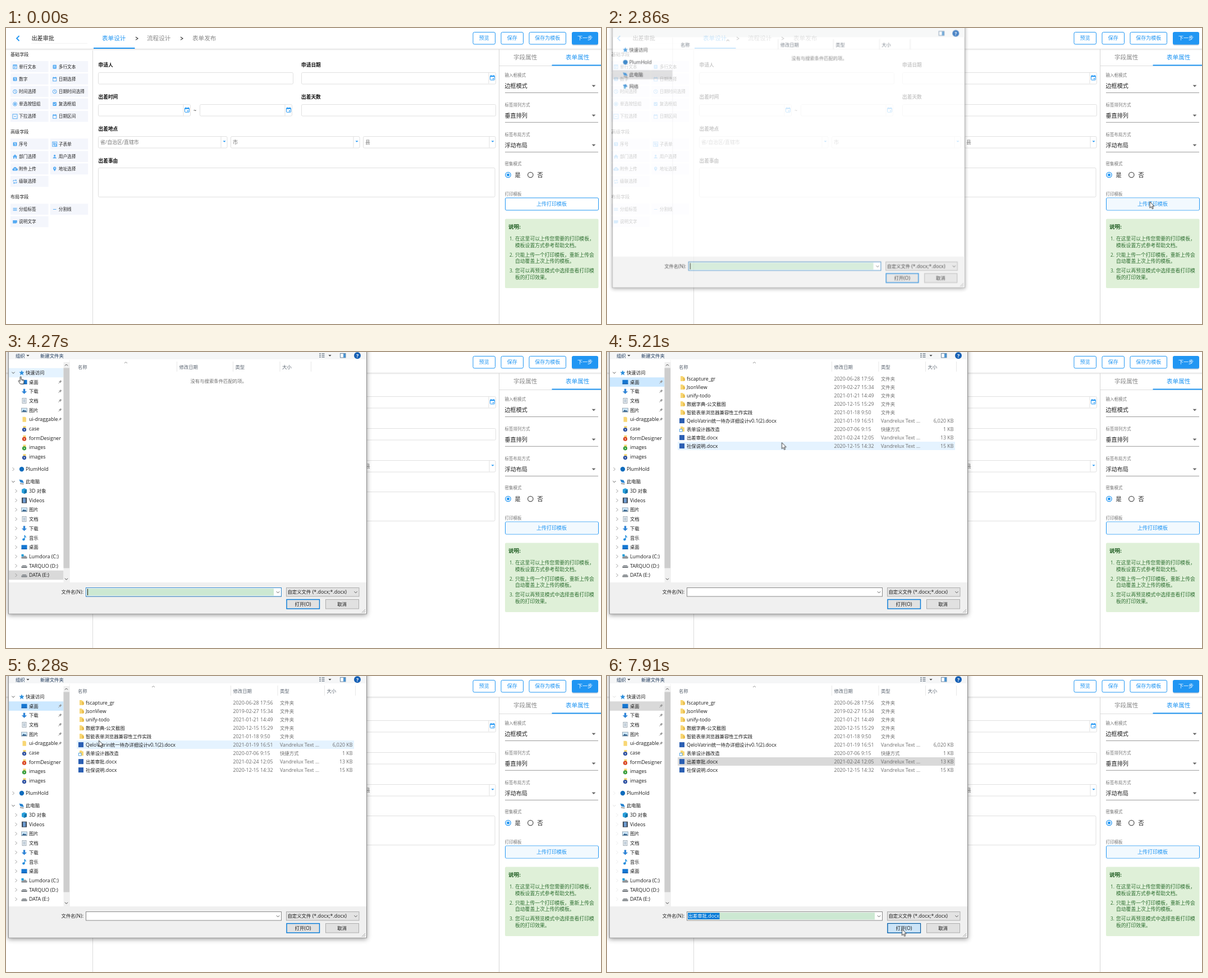
An HTML page that plays this animation: 1060x528 px, repeating every 8 s.

```html
<!DOCTYPE html>
<html lang="zh-CN">
<head>
<meta charset="utf-8">
<title>表单设计</title>
<style>
html, body { margin: 0; width: 100%; height: 100%; overflow: hidden; background: #fff; }
svg { display: block; width: 1060px; height: 528px; font-family: "Open Sans", "Noto Sans CJK SC", "Noto Sans CJK", sans-serif; }
text { white-space: pre; }
#dialog text { font-size: 8.85px; }
#dialog tspan { font-size: 8.4px; }
#dialog { transform-origin: 323px 212px; }
.frame { filter: drop-shadow(0 2px 4px rgba(0, 0, 0, .4)); }
.spin { animation: spin 1s linear infinite; }
@keyframes spin { to { transform: rotate(360deg); } }
</style>
</head>
<body>
<svg id="stage" viewBox="0 0 1060 528"></svg>
<script>
const BLUE = '#2196f3', LINE = '#e0e0e0';
let css = '';

// Timelines: each step is [milliseconds, declarations] within the 8 s loop.
const track = (cls, steps, ease = 'step-end') => {
  const frames = [...steps, [8000, steps[steps.length - 1][1]]];
  css += `@keyframes ${cls}{${frames.map(([ms, v]) => `${ms / 80}%{${v}}`).join('')}}` +
    `.${cls}{animation:${cls} 8s ${ease} infinite}`;
};
const during = (cls, from, to = 8000) => track(cls,
  [[0, 'visibility:hidden'], [from, 'visibility:visible'], [to, 'visibility:hidden']]);

// Drawing helpers; text is placed by its vertical centre.
const text = (x, y, s, size = 8.8, fill = '#333', more = '') =>
  `<text x="${x}" y="${y + size * .37}" font-size="${size}" fill="${fill}" ${more}>${s}</text>`;
const box = (x, y, w, h, fill = 'none', stroke = 'none', r = 0, more = '') =>
  `<rect x="${x}" y="${y}" width="${w}" height="${h}" rx="${r}" fill="${fill}" stroke="${stroke}" ${more}/>`;
const path = (d, stroke = 'none', width = 1, fill = 'none') =>
  `<path d="${d}" stroke="${stroke}" stroke-width="${width}" fill="${fill}"/>`;
const disc = (x, y, r, fill, stroke = 'none', width = 1) =>
  `<circle cx="${x}" cy="${y}" r="${r}" fill="${fill}" stroke="${stroke}" stroke-width="${width}"/>`;
const group = (cls, s) => `<g class="${cls}">${s}</g>`;
const at = (x, y, s) => `<g transform="translate(${x} ${y})">${s}</g>`;
const triangle = (x, y, w, fill) => path(`M${x - w} ${y - w / 2}h${2 * w}l${-w} ${w}z`, 'none', 0, fill);

const C = '#56abf3';
const solid = (s, color = C) => path(s, 'none', 0, color);
const stroke = (s, color = C, width = 1) => path(s, color, width);
const icons = {
  note: box(-3.2, -3.2, 6.4, 6.8, 'none', C) + stroke('M-3-2.4h6', C, 1.6) + stroke('M-1.8 0h3.6M-1.8 1.8h2.4'),
  clip: box(-3.2, -3.3, 6.4, 7, C, 'none', 1) + stroke('M-1.7-1h3.4M-1.7 1h3.4', '#fff', .8),
  one: box(-3.4, -3.4, 6.8, 6.8, C, 'none', 1) + stroke('M-1-1.4L.3-2V2.2', '#fff', 1),
  cal: box(-3, -2.8, 6, 6.3, 'none', C) + stroke('M-3-2h6', C, 1.5) + stroke('M-1.8-4v1.5M1.8-4v1.5'),
  clock: disc(0, 0, 3.4, 'none', C) + stroke('M0-2V.2L1.6 1.2'),
  radio: disc(0, 0, 3.4, 'none', C) + disc(0, 0, 1.9, C),
  check: box(-3.3, -3.3, 6.6, 6.6, C, 'none', 1) + stroke('M-2 0l1.5 1.5L2-1.4', '#fff'),
  drop: box(-4, -4, 8, 8, 'none', C) + triangle(0, .2, 1.8, C),
  table: box(-4, -4, 8, 8, 'none', C) + stroke('M-2.5-1.5h5M-2.5.5h2M-1.5-3v5') + box(0, 0, 3, 3, 'none', C),
  home: solid('M-4.2 0L0-3.8 4.2 0H3v3.5H1V1h-2v2.5h-2V0z'),
  user: disc(0, -1.6, 1.7, C) + solid('M-3.2 3.2c0-3.6 6.4-3.6 6.4 0z'),
  cloud: solid('M-2.5 3a2 2 0 0 1-.5-4 3.1 3.1 0 0 1 6-.3A2.1 2.1 0 0 1 3 3z') + stroke('M0 2V-.7M-1.2.4L0-.8 1.2.4', '#fff', .8),
  spot: solid('M0 4C-5-2-2-4 0-4s5 2 0 8z') + disc(0, -1.4, .9, '#fff'),
  loop: stroke('M-3 0v-2h5.5M1-3.6L2.8-2 1-.5M3 .5v2h-5.5M-1 4l-1.8-1.5L-1 1'),
  lines: stroke('M-3.5-2h7M-3.5 0h7M-3.5 2h7'),
  dash: stroke('M-2.8 0h5.6'),
  tag: solid('M-3.8-2.8h7.6v3.8L2 2.8h-5.8z')
};

const fieldGroups = [
  ['基础字段', 47, 69, 'note 单行文本 clip 多行文本 one 数字 cal 日期选择 clock 时间选择 clock 日期时间选择 radio 单选按钮组 check 复选框组 drop 下拉选择 cal 日期区间'],
  ['高级字段', 185, 207.2, 'one 序号 table 子表单 home 部门选择 user 用户选择 cloud 附件上传 spot 地址选择 loop 级联选择'],
  ['布局字段', 301.5, 323.5, 'lines 分组标签 dash 分割线 tag 说明文字']
];
const palette = () => fieldGroups.map(([title, titleY, top, list]) => {
  const words = list.split(' ');
  let s = text(8, titleY, title, 8.1, '#222');
  for (let i = 0; i < words.length / 2; i++) {
    const x = i % 2 * 70.7, y = top + (i >> 1) * 22.2;
    s += box(8 + x, y - 10, 67.5, 19.6, '#f4f6fc') + at(16 + x, y, icons[words[2 * i]]) + text(23 + x, y - .3, words[2 * i + 1], 7.7, '#222');
  }
  return s;
}).join('');

const button = (x, w, label, size = 9) => box(x + .5, 7.5, w - 1, 21.5, '#fff', BLUE, 2.5) +
  text(x + w / 2, 18, label, size, BLUE, 'text-anchor="middle"');
const header = () => box(0, 0, 1060, 37.5, '#fff') + box(0, 37, 1060, 1, '#dedede') + box(0, 38, 1060, 2, '#f5f5f5') +
  path('M23.5 14l-4.5 4.5 4.5 4.5', BLUE, 1.8) + text(45.5, 18, '出差审批', 10.1, '#222') + box(45, 27, 100, .7, '#eee') +
  text(171, 18.5, '表单设计', 10.6, BLUE) + box(156, 35, 73.5, 2, BLUE) +
  text(251, 18.5, '流程设计', 10.6, '#8a8a8a') + text(332, 18.5, '表单发布', 10.6, '#8a8a8a') +
  path('M231 16l4 2.7-4 2.7M311 16l4 2.7-4 2.7', '#333', 1.1) +
  button(831.5, 40.5, '预览') + button(881.5, 40.5, '保存') + button(931.5, 66.5, '保存为模板') +
  box(1008, 8.5, 47, 22.5, '#bcd', 'none', 3) + box(1008, 7, 47, 22.5, BLUE, 'none', 3) +
  text(1031.5, 18, '下一步', 9, '#fff', 'text-anchor="middle"');

const label = (x, y, s) => text(x, y, s, 8.7, '#111', 'font-weight="700"');
const input = (x, y, w, h = 20.5) => box(x + .5, y + .5, w - 1, h, '#fff', LINE, 2);
const calendar = (x, y) => path(`M${x - 6.5} ${y - 9.5}v20`, LINE) +
  at(x, y, box(-4, -3.2, 8, 7.5, '#fff', BLUE, 1) + stroke('M-4-2.4h8', BLUE, 2) + stroke('M-2.5-4.6v2M2.5-4.6v2', BLUE) + box(.5, 1, 2, 1.8, BLUE));
const select = (x, w, hint) => input(x, 193, w) + text(x + 4, 203.3, hint, 8.9, '#777') +
  path(`M${x + w - 11.5} 193.5v20`, LINE) + triangle(x + w - 5.5, 202.5, 2.6, BLUE);
const form = () => label(164.5, 66, '申请人') + label(526, 66, '申请日期') + label(164.5, 122.7, '出差时间') +
  label(526, 122.7, '出差天数') + label(164.5, 180, '出差地点') + label(164.5, 237, '出差事由') +
  input(164, 79, 348) + input(526, 79, 347) + calendar(866.5, 88.5) +
  input(164, 136, 165) + calendar(322.5, 146) + text(334, 147, '~', 9, '#333') +
  input(345, 136, 165) + calendar(503.5, 146) + input(526, 136, 347) +
  select(164, 230.5, '省/自治区/直辖市') + select(400, 230.5, '市') + select(636, 236.5, '县') + input(164, 249, 707.5, 52);

const setting = (y, name, value) => text(888.5, y, name, 7.5, '#777') + text(888.5, y + 19.5, value, 10.1, '#222') +
  box(889, y + 31, 166, 1, '#9a9a9a') + triangle(1047, y + 19.5, 3.4, '#666');
const tips = [['在这里可以上传您需要的打印模板，', '模板设置方式参考帮助文档。'],
  ['只能上传一个打印模板，重新上传会', '自动覆盖上次上传的模板。'], ['您可以再预览模式中选择查看打印模', '板的打印效果。']];
const settings = () => path('M878.5 38V528', '#d6d6d6') + text(904, 52, '字段属性', 10.6, '#888') + text(997, 52, '表单属性', 10.6, BLUE) +
  box(879, 67, 181, 1, '#ddd') + box(972.5, 65.5, 87.5, 2, BLUE) +
  setting(84, '输入框模式', '边框模式') + setting(136.8, '标签排列方式', '垂直排列') + setting(189.8, '标签布局方式', '浮动布局') +
  text(888.5, 242.5, '密集模式', 7.5, '#777') + disc(894.5, 262, 4.7, '#fff', BLUE, 1.3) + disc(894.5, 262, 2.5, BLUE) +
  text(906.5, 262.5, '是', 10.2, '#222') + disc(934.3, 262, 4.7, '#fff', '#555', 1.3) + text(946.5, 262.5, '否', 10.2, '#222') +
  text(888.5, 296, '打印模板', 7.5, '#777') + box(889.5, 303, 166, 22, '#fff', BLUE, 2) +
  box(890, 303.5, 165, 21, '#f2f9fe', 'none', 2, 'class="uploadHover"') +
  text(972, 314, '上传打印模板', 9, BLUE, 'text-anchor="middle"') +
  box(889, 340.5, 166.5, 123.5, '#dff0d8', 'none', 2) + text(895, 354, '说明:', 9.6, '#1f5c22', 'font-weight="700"') +
  tips.map((lines, i) => text(897, 376 + i * 28.4, `${i + 1}.`, 8.4, '#2f7032') +
    lines.map((s, j) => text(907, 376 + i * 28.4 + j * 11.7, s, 8.8, '#2f7032')).join('')).join('');

// File dialog
const say = (x, y, s, fill = '#1b1b1b', more = '') =>
  `<text x="${x}" y="${y + 3.1}" fill="${fill}" ${more}>${s.replace(/[\u3000-\uffff]+/g, '<tspan>$&</tspan>')}</text>`;
const YELLOW = '#f8d775';
const ball = (color) => solid('M-2-5h5v8h-5z', YELLOW) + disc(0, 1.5, 3.6, color) + stroke('M-1 .5l2 .8-1.6 1.8', '#fff', 1);
const page = box(-3.5, -4.5, 7, 9, '#f5f7f9', '#8b9aa5', 0, 'stroke-width=".8"') + stroke('M-2-2h4M-2 0h4M-2 2h4', '#6f8fa8', .8);
const disk = solid('M-5 1l2-2h6l2 2v2.5H-5z', '#6f7479') + stroke('M-4.5 1h9', '#d6d9dc', 1);
const files = {
  star: solid('M0-4.5l1.3 3 3.3.3L2.1 1l.9 3.5L0 2.6-3 4.5l.9-3.5-2.5-2.2 3.3-.3z', '#2d8fdd'),
  desk: box(-5, -3.8, 10, 7.5, '#1577d2') + stroke('M-5 3.2h10', '#0b4f9c'),
  down: solid('M-1.7-4.5h3.4V0h3L0 4.5-4.7 0h3z', '#2f84d6'),
  page,
  pic: box(-5, -3.5, 10, 7, '#cfe8fa', '#8b9aa5', 0, 'stroke-width=".8"') + solid('M-4.5 3L-1-.6 1 1l1.2-1L4.5 3z', '#35618a'),
  folder: solid('M-3-4.5h5l1.4 2v7H-3z', YELLOW),
  navy: ball('#274b9f'), red: ball('#d8401f'), green: ball('#2f9a35'),
  sky: disc(0, 0, 4.2, '#0f6cbd'),
  pc: solid('M-4.5-3.8l6 1 2.5 5.3-6.5-1.2z', '#2783d0') + stroke('M-3 3.3l6.5 1', '#777', 1.4),
  cube: solid('M0-5l4.5 2v6L0 5l-4.5-2v-6z', '#2aa0dc') + solid('M0-.8L4.5-3v6L0 5z', '#1272a8'),
  film: box(-4.5, -5, 9, 10, '#3c4754') + box(-2.5, -4, 5, 8, '#6d9bd0'),
  note: disc(-1.2, 3, 2.1, '#1689dc') + stroke('M.6 3v-7.6c.5 2 2.6 2 2.2 4.4', '#1689dc', 1.2),
  disk, system: disk + box(-5, -4, 4, 4, '#169cd8'),
  net: solid('M-4.5-2.5l5.5-1.7 3 4.4-5.5 1.6z', '#2783d0') + disc(-1, 2.2, 2, '#58acd9')
};
const pushpin = (y) => at(96, y, `<g transform="rotate(45)">${solid('M-1.4-3.2h2.8v3l1 .9h-4.8l1-.9z', '#9a9a9a')}${stroke('M0 .5v3.4', '#9a9a9a', .9)}</g>`);
const rightArrow = (x, y) => path(`M${x - 1.5} ${y - 3}l3 3-3 3`, '#999');
const downArrow = (x, y, color = '#555') => path(`M${x - 2.6} ${y - 1.3}l2.6 2.6 2.6-2.6`, color);

const quick = 'desk 桌面 down 下载 page 文档 pic 图片 folder ui-draggable navy case red formDesigner green images navy images'.split(' ');
const drives = ['cube', '3D 对象', 'film', 'Videos', 'pic', '图片', 'page', '文档', 'down', '下载', 'note', '音乐',
  'desk', '桌面', 'system', 'Lumdora (C:)', 'disk', 'TARQUO (D:)', 'disk', 'DATA (E:)'];
const branch = (list, top, more = () => '') => {
  let s = '';
  for (let i = 0; i < list.length / 2; i++) {
    const y = top + i * 16.68;
    s += at(32.5, y, files[list[2 * i]]) + say(41, y, list[2 * i + 1]) + more(i, y);
  }
  return s;
};
const root = (y, icon, s) => at(28, y, files[icon]) + say(35, y, s);
const treeRow = (y, fill, cls) => box(5, y - 8.3, 97.5, 16.6, fill, 'none', 0, `class="${cls}"`);
const tree = () => group('loading', box(5, 73, 108, 16.5, '#d9d9d9') +
    root(36, 'star', '快速访问') + root(58.5, 'sky', 'PlumHold') + root(81, 'pc', '此电脑') + root(102.5, 'net', '网络')) +
  treeRow(37, '#e5f3ff', 'hoverQuick') + treeRow(53.6, '#e5f3ff', 'hoverDesk') + treeRow(53.6, '#cce8ff', 'deskActive') +
  treeRow(53.6, '#d9d9d9', 'deskIdle') + treeRow(398, '#d9d9d9', 'driveIdle') +
  group('ready', root(37, 'star', '快速访问') + root(209, 'sky', 'PlumHold') + root(231.3, 'pc', '此电脑') +
    branch(quick, 53.6, (i, y) => i < 5 ? pushpin(y) : '') + branch(drives, 248) +
    box(102.5, 18, 10.5, 393, '#f0f0f0') + box(102.5, 28.5, 10.5, 357, '#cdcdcd') +
    path('M105 24.5l2.5-2.5 2.5 2.5', '#444') + downArrow(107.5, 405, '#444') +
    group('chevrons', downArrow(13, 37) + rightArrow(13, 209) + downArrow(13, 231.3) +
      drives.slice(0, 10).map((_, i) => rightArrow(18, 248 + i * 16.68)).join('')));

const columns = (cls, sort, xs) => group(cls, path(`M${sort - 2.5} 20l2.5-2 2.5 2`, '#777', .8) +
  xs.map((x, i) => box(x, 17, 1, 18, '#e8e8e8') + say(x + 4.5, 26.7, ['修改日期', '类型', '大小', ''][i], '#5a6470')).join(''));

const WORD = 'Vandrelux Text ...', DIR = '文件夹';
const listing = [
  ['fscapture_gr', '2020-06-28 17:56', DIR], ['JsonView', '2019-02-27 15:34', DIR], ['unify-todo', '2021-01-21 14:49', DIR],
  ['数据字典-公文截图', '2020-12-15 15:29', DIR], ['智能表单浏览器兼容性工作实践', '2021-01-18 9:50', DIR],
  ['QeloVatrin统一待办详细设计v0.1(2).docx', '2021-01-19 16:51', WORD, '6,020 KB'],
  ['表单设计器改造', '2020-07-06 9:15', '快捷方式', '1 KB'],
  ['出差审批.docx', '2021-02-24 12:05', WORD, '13 KB'], ['社保说明.docx', '2020-12-15 14:32', WORD, '15 KB']
];
const fileIcon = (type) => type === WORD ? box(-5, -4.5, 9, 9, '#2b5fb3')
  : solid('M-3-4.5h4l1 1.5h2v7.5h-7z', YELLOW) + (type === DIR ? solid('M1-2l4 1.5v4L2 4z', '#e9bd4e') : box(-4.5, 0, 4.5, 4.5, '#fff', '#2d8fdd', 0, 'stroke-width=".8"'));
const fileRow = (y, fill, cls) => box(126, y, 494, 15, fill, 'none', 0, `class="${cls}"`);
const list = () => group('listed', listing.map(([name, date, type, size = ''], i) => {
  const y = 47.6 + i * 15;
  return at(134, y, fileIcon(type)) + say(142, y, name) + say(404.5, y, date, '#6d6d6d') + say(488, y, type, '#6d6d6d') +
    say(617.5, y, size, '#6d6d6d', 'text-anchor="end"');
}).join(''));

const dialogButton = (x, s, more) => more + say(x + 29.5, 449.5, s, '#111', 'text-anchor="middle"');
const fileField = () => say(138, 428.3, '文件名(N):', '#222', 'text-anchor="end"') + box(142.5, 420.5, 348, 15.5, '#fff', '#8a8a8a') +
  group('fieldFocus', box(142.5, 420.5, 348, 15.5, '#fff', '#2f86cc') + box(144, 422, 333, 12.5, '#cce8d2') + box(145, 422.5, 1, 11.5, '#111', 'none', 0, 'class="caret"')) +
  group('named', say(144.5, 428.3, '出差审批.docx')) +
  group('picked', box(144, 422, 333, 12.5, '#cce8d2') + box(144, 422.5, 56.5, 11.5, '#0078d7') + say(144.5, 428.3, '出差审批.docx', '#fff')) +
  downArrow(484.5, 428.5) + box(499.5, 420.5, 129.5, 15.5, '#e3e3e3', '#adadad') + say(501.5, 428.3, '自定义文件 (*.docx;*.docx)') + downArrow(623, 428.5) +
  dialogButton(499.5, '打开(O)', box(500, 441.5, 58.5, 16.5, '#e1e1e1', '#0078d7', 0, 'stroke-width="1.4"') +
    box(500, 441.5, 58.5, 16.5, '#e5f1fb', '#0078d7', 0, 'class="openHover"') + box(500, 441.5, 58.5, 16.5, '#cce4f7', '#005499', 0, 'class="openDown"')) +
  dialogButton(569, '取消', box(569.5, 441.5, 59, 16.5, '#e1e1e1', '#adadad'));

const dialog = () => `<g id="dialog" class="opening">` +
  box(4.5, -40, 638, 507, '#fff', '#8c8c8c', 0, 'class="frame"') + box(5, -40, 637, 53, '#f5f6f7') + box(5, 411, 637, 55.5, '#f0f0f0') +
  group('ready', say(17, 6.5, '组织', '#1e395b') + triangle(39, 6.5, 2.6, '#333') + say(61, 6.5, '新建文件夹', '#1e395b') +
    path('M558 3h3M558 6h3M558 9h3M562.5 3h5M562.5 6h5M562.5 9h5', '#7a8793', 1.3) + triangle(577, 6.5, 2.6, '#333')) +
  box(595.5, 2.5, 9.5, 7.5, '#fff', '#6d8aa5') + box(601, 3, 4, 7, '#4d94d0') +
  disc(626, 6.3, 6, '#1660b5') + say(626, 6.6, '?', '#fff', 'text-anchor="middle" font-weight="700"') +
  box(113, 14, .7, 397, '#eee') + tree() + say(128, 26.7, '名称', '#5a6470') +
  columns('columnsEmpty', 213.5, [304, 404, 487.5, 543]) + columns('columnsFull', 262.5, [400, 483.5, 567, 622]) +
  group('columnsEmpty', say(328.5, 51.5, '没有与搜索条件匹配的项。', '#6d6d6d')) +
  fileRow(40, '#e5f3ff', 'rowHover') + fileRow(145, '#cce8ff', 'rowActive') + fileRow(145, '#d9d9d9', 'rowIdle') + list() + fileField() +
  path('M634 465l6-6M637 465l3-3', '#aaa', 1) + '</g>';

const arrow = path('M0 0v11.2l2.6-2.4 1.8 4 1.8-.8-1.8-3.9h3.4z', '#222', .9, '#fff');
const hand = path('M-1 .8c0-1.3 2-1.3 2 0v4l4 .9c1 .3 1.2 1 1.1 1.8L5.5 13H-.6l-3.2-4.8c-.6-1 .5-1.8 1.3-1.1L-1 8.5z', '#222', .9, '#fff') +
  path('M2.6 5.5v2M4.3 6v1.7', '#222', .7);
const cursor = () => group('cursor', group('asArrow', arrow) + group('asHand', hand) +
  group('busy', at(8.5, 1, group('spin', disc(0, 0, 3.3, 'none', '#9fd4f5', 1.8) + path('M0-3.3a3.3 3.3 0 0 1 3.3 3.3', '#1a7fd0', 1.8)))));

track('uploadHover', [[0, 'opacity:0'], [820, 'opacity:0'], [1100, 'opacity:1']], 'linear');
track('opening', [[0, 'opacity:0;transform:scale(.93)'], [2740, 'opacity:0;transform:scale(.93)'], [2780, 'opacity:.4;transform:scale(.95)'],
  [2860, 'opacity:.78;transform:scale(.984)'], [2940, 'opacity:1;transform:scale(1)']], 'linear');
track('chevrons', [[0, 'opacity:0'], [3950, 'opacity:0'], [4200, 'opacity:1'], [7650, 'opacity:1'], [7910, 'opacity:.2'], [7990, 'opacity:0']], 'linear');
track('caret', [[0, 'opacity:1'], [3440, 'opacity:0'], [3970, 'opacity:1'], [4500, 'opacity:0']]);
during('loading', 0, 2940);
during('ready', 2940);
during('hoverQuick', 4050, 4330);
during('hoverDesk', 4330, 4650);
during('deskActive', 4650, 6980);
during('deskIdle', 6980);
during('driveIdle', 2940, 4650);
during('columnsEmpty', 0, 4820);
during('columnsFull', 4820);
during('listed', 5130);
during('rowActive', 6980, 7850);
during('rowIdle', 7850);
during('fieldFocus', 0, 4820);
during('named', 6980, 7850);
during('picked', 7850);
during('openHover', 7600, 7850);
during('openDown', 7850);
during('busy', 1770, 2580);
track('asHand', [[0, 0], [600, 1], [1770, 0], [3950, 1], [5130, 0]].map(([ms, v]) => [ms, `opacity:${v}`]));
track('asArrow', [[0, 1], [600, 0], [1770, 1], [3950, 0], [5130, 1]].map(([ms, v]) => [ms, `opacity:${v}`]));
track('rowHover', [[0, -1], [5130, 5], [5200, 8], [5480, 7], [5780, 6], [6000, 5], [6130, 4], [6230, 5], [6560, 6], [6650, 7], [6980, -1]]
  .map(([ms, row]) => [ms, row < 0 ? 'visibility:hidden' : `visibility:visible;transform:translateY(${row * 15}px)`]));
track('cursor', [[0, 1080, 550], [129, 1080, 550], [130, 1050, 512], [280, 1012, 420], [430, 985, 350], [660, 967.5, 310], [2860, 967.5, 310],
  [3100, 850, 260], [3550, 425, 150], [3620, 415, 145], [3950, 100, 75], [4150, 24, 41], [4270, 26, 44], [4420, 36, 49], [4500, 38, 50],
  [5080, 38, 50], [5130, 230, 130], [5210, 311.5, 161.5], [5480, 285, 158], [5880, 225, 133], [6150, 175, 110], [6280, 165.5, 115],
  [6500, 162, 126], [6740, 172, 150], [7050, 172, 150], [7450, 470, 460], [7600, 535, 467], [7750, 526, 452], [7910, 525.5, 451.5]]
  .map(([ms, x, y]) => [ms, `transform:translate(${x}px,${y}px)`]), 'linear');

document.head.appendChild(document.createElement('style')).textContent = css;
document.getElementById('stage').innerHTML = box(0, 0, 1060, 528, '#fff') + path('M154.5 38V528', '#dcdcdc') +
  header() + palette() + form() + settings() + dialog() + cursor();
</script>
</body>
</html>
```
